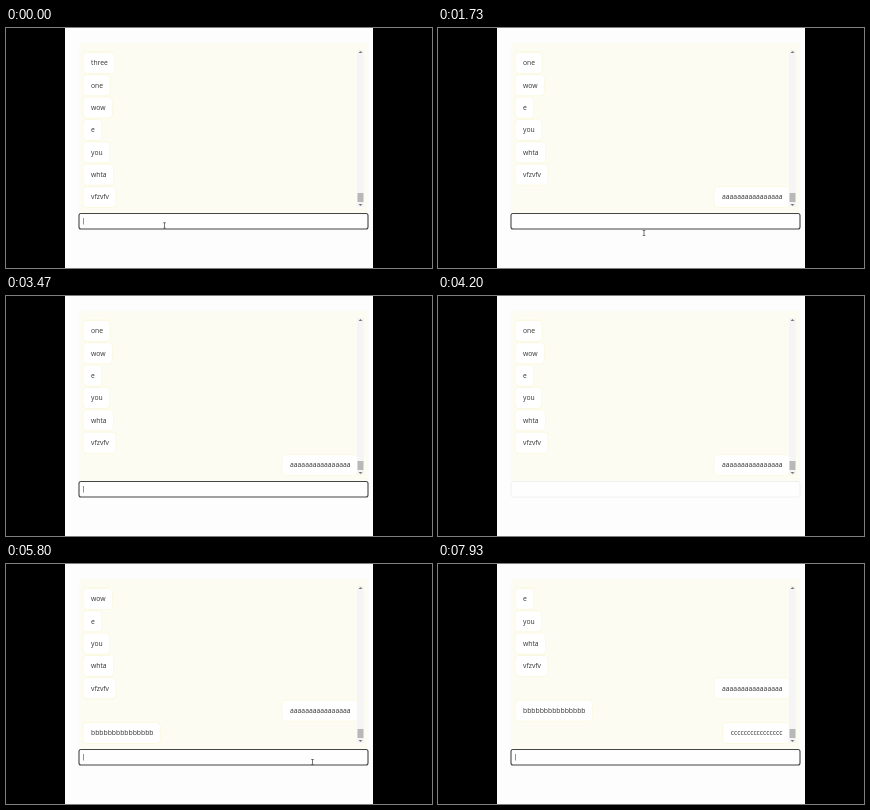
Recreate the animation shown at these times as an HTML page with a canvas. Size 426 by 240 pixels, loop 8000 ms.

```html
<!DOCTYPE html>
<html lang="en">
<head>
<meta charset="utf-8">
<title>Chat</title>
<style>
html, body { margin: 0; width: 100%; height: 100%; overflow: hidden; background: #000; }
canvas { display: block; width: 100vw; height: 100vh; }
</style>
</head>
<body>
<canvas></canvas>
<script>
const W = 426, H = 240, LOOP = 8000;
const FONT = '6.8px "Open Sans", "Noto Sans", sans-serif';
const canvas = document.querySelector('canvas');
const g = canvas.getContext('2d');

const SENT_A = 1150, BLUR = 3500, RECEIVED_B = 4950, FOCUS = 5500, SENT_C = 7500;
const messages = [
  ...['two', 'three', 'one', 'wow', 'e', 'you', 'whta', 'vfzvfv'].map(text => ({ text, at: -1 })),
  { text: 'a'.repeat(16), at: SENT_A, mine: true },
  { text: 'b'.repeat(15), at: RECEIVED_B },
  { text: 'c'.repeat(16), at: SENT_C, mine: true }
];
// A held key: one letter, a pause, then rapid repeats.
const typing = [
  { letter: 'a', count: 16, start: 150, repeat: 470, sent: SENT_A },
  { letter: 'c', count: 16, start: 6000, repeat: 6355, sent: SENT_C }
];
// Pointer keys: time, x, y
const pointer = [
  [0, 158.5, 197.5], [1250, 158.5, 197.5], [1730, 206, 205], [2150, 245, 250],
  [5000, 306.5, 250], [5400, 306.5, 198], [6950, 306.5, 198], [7300, 340, 250], [LOOP, 340, 250]
];

function box(x, y, w, h, r, fill, stroke, line = 1) {
  g.beginPath();
  g.roundRect(x, y, w, h, r);
  if (fill) { g.fillStyle = fill; g.fill(); }
  if (stroke) { g.strokeStyle = stroke; g.lineWidth = line; g.stroke(); }
}

function label(text, x, y) {
  g.fillStyle = '#333';
  g.fillText(text, x, y);
}

function triangle(x, y, dir) {
  g.beginPath();
  g.moveTo(x - 2, y + dir);
  g.lineTo(x + 2, y + dir);
  g.lineTo(x, y - dir);
  g.fillStyle = '#777';
  g.fill();
}

function drawMessages(t) {
  g.save();
  g.beginPath();
  g.rect(73, 22, 289, 160);
  g.clip();
  messages.filter(m => t >= m.at).slice(-8).reverse().forEach((m, i) => {
    const y = 169 - i * 22.35;
    const width = g.measureText(m.text).width + 15;
    const x = m.mine ? 351.5 - width : 77;
    box(x, y - 10.5, width, 21, 4, '#fff', '#faf8dc', 0.8);
    label(m.text, x + 8, y + 2.3);
  });
  g.restore();
}

function drawScrollbar() {
  box(351, 22, 7, 157, 0, '#f5f5f6');
  triangle(354.5, 24, 1);
  triangle(354.5, 177, -1);
  box(351.5, 165, 6, 9, 0, '#b8b8b8');
}

function drawInput(t) {
  const focused = t < BLUR || t >= FOCUS;
  box(73, 185.5, 289, 15.5, 2, '#fefefe', focused ? '#444448' : '#ececec', focused ? 1.1 : 0.8);
  let text = '', active = t >= FOCUS ? FOCUS : 0;
  for (const k of typing) {
    if (t < k.start) continue;
    const repeats = Math.max(0, Math.floor((t - k.repeat) / 33) + 1);
    const n = Math.min(k.count, 1 + repeats);
    if (t < k.sent) text = k.letter.repeat(n);
    const last = n > 1 ? k.repeat + (n - 2) * 33 : k.start;
    active = Math.max(active, t >= k.sent ? k.sent : last);
  }
  label(text, 77, 195.4);
  if (focused && Math.floor((t - active) / 530) % 2 === 0) {
    g.fillStyle = '#777';
    g.fillRect(77 + g.measureText(text).width, 190, 0.8, 6.5);
  }
}

function drawPointer(t) {
  const i = pointer.findIndex(p => p[0] > t);
  const a = pointer[i - 1], b = pointer[i];
  const u = (t - a[0]) / (b[0] - a[0]), s = u * u * (3 - 2 * u);
  const x = a[1] + (b[1] - a[1]) * s, y = a[2] + (b[2] - a[2]) * s;
  g.fillStyle = '#555';
  g.fillRect(x - 0.4, y - 3, 0.8, 6);
  g.fillRect(x - 1.4, y - 3, 2.8, 0.7);
  g.fillRect(x - 1.4, y + 2.3, 2.8, 0.7);
}

function draw(now) {
  const t = now % LOOP, ratio = devicePixelRatio || 1;
  const w = Math.round(innerWidth * ratio), h = Math.round(innerHeight * ratio);
  if (canvas.width !== w || canvas.height !== h) {
    canvas.width = w;
    canvas.height = h;
  }
  g.setTransform(w / W, 0, 0, h / H, 0, 0);
  g.font = FONT;
  box(0, 0, W, H, 0, '#000');
  box(59, 0, 308, H, 0, '#fdfdfd');
  box(73, 15, 289, 170, 0, '#fdfcf3');
  drawMessages(t);
  drawScrollbar();
  drawInput(t);
  g.save();
  g.beginPath();
  g.rect(59, 0, 308, H);
  g.clip();
  drawPointer(t);
  g.restore();
}

const begin = performance.now();
function frame() {
  draw(performance.now() - begin);
  requestAnimationFrame(frame);
}
frame();
</script>
</body>
</html>
```
